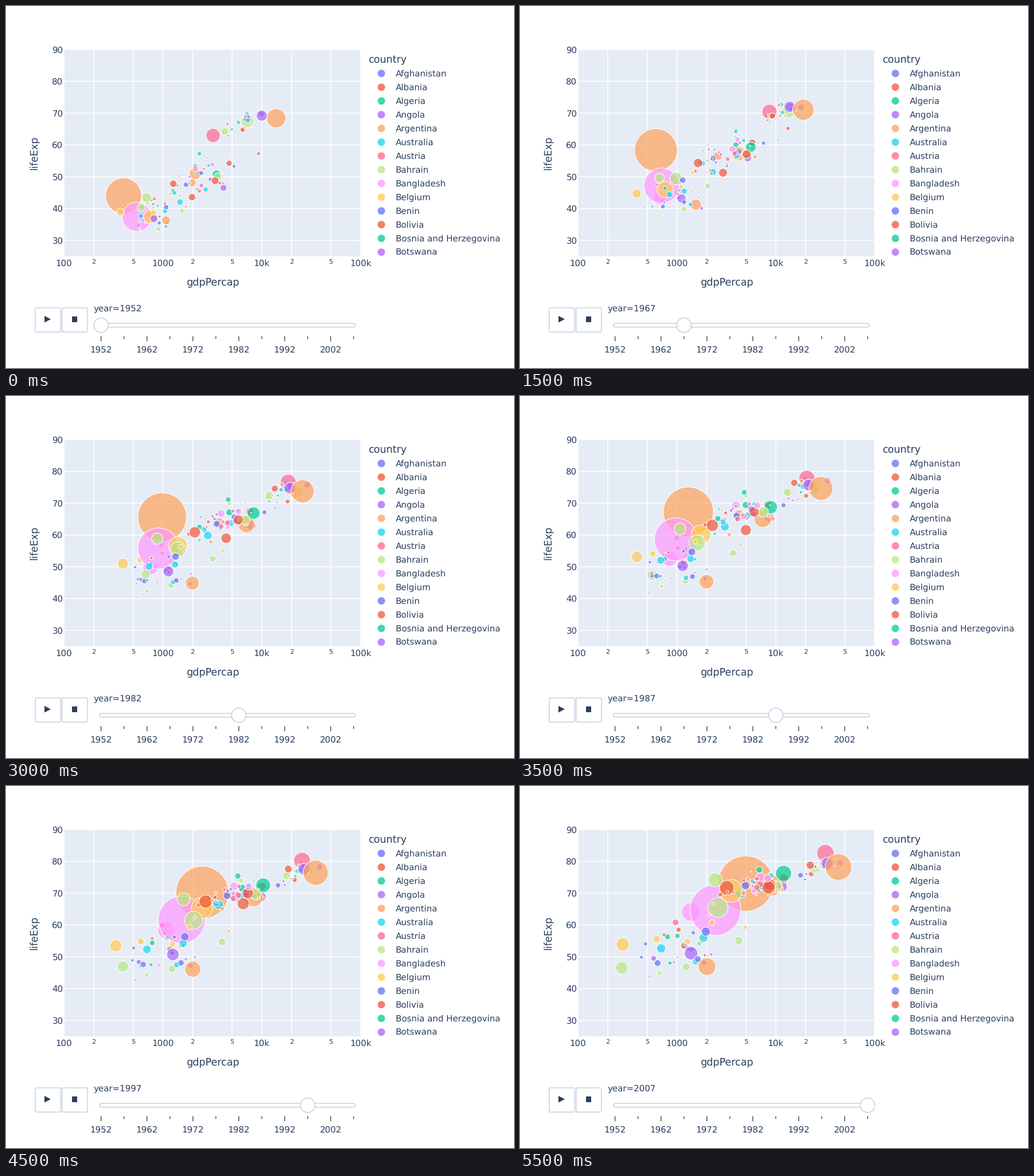
A matplotlib script that plays this animation: 885x632 px, repeating every 6000 ms.

```python
import numpy as np
import matplotlib.pyplot as plt
from matplotlib.animation import FuncAnimation
from matplotlib.colors import to_rgba
from matplotlib.patches import Circle, FancyBboxPatch, Polygon, Rectangle

W, H, DPI = 885, 632, 64
PT = 72 / DPI  # points per pixel
LEFT, RIGHT, TOP, BOTTOM = 101, 618, 76, 437
INK, BORDER = "#2a3f5f", "#bec8d9"
PALETTE = ["#636efa", "#ef553b", "#00cc96", "#ab63fa", "#ffa15a",
           "#19d3f3", "#ff6692", "#b6e880", "#ff97ff", "#fecb52"]
LEGEND = ["Afghanistan", "Albania", "Algeria", "Angola", "Argentina",
          "Australia", "Austria", "Bahrain", "Bangladesh", "Belgium", "Benin",
          "Bolivia", "Bosnia and Herzegovina", "Botswana"]
YEARS = np.arange(1952, 2008, 5)
KNOTS = {2: (1952, 2007), 3: (1952, 1977, 2007), 4: (1952, 1967, 1987, 2007),
         6: (1952, 1962, 1967, 1977, 1990, 2007)}
MAX_RADIUS, MAX_POP = 48.3, 1319
COUNT = 142

tracks = {}


def px(gdp):
    return LEFT + (np.log10(gdp) - 2) * (RIGHT - LEFT) / 3


def py(life):
    return BOTTOM - (life - 25) * (BOTTOM - TOP) / 65


def over_years(values):
    return np.interp(YEARS, KNOTS[len(values)], values)


def country(rank, pops, *points):
    """Follow a few (GDP, life expectancy) points; rank sets colour and depth."""
    gdps, lives = np.transpose(points)
    radius = MAX_RADIUS * over_years(np.sqrt(np.array(pops) / MAX_POP))
    tracks[rank] = np.column_stack(
        [over_years(px(gdps)), over_years(py(lives)), radius])


# The most visible bubbles; populations in millions
country(24, (556, 960, 1319), (400, 44), (488, 44.5), (613, 58.4), (741, 64), (1550, 68.2), (4959, 73))
country(58, (372, 1110), (547, 37.4), (701, 47.2), (977, 58.6), (2452, 64.7))
country(59, (82, 224), (750, 37.5), (762, 46), (1748, 60.1), (3541, 70.7))
country(134, (158, 301), (13990, 68.4), (42952, 78.2))
country(14, (57, 190), (2109, 50.9), (6660, 61.5), (9066, 72.4))
country(66, (86, 127), (3217, 63), (16610, 75.4), (31656, 82.6))
country(97, (41, 169), (685, 43.4), (2606, 65.5))
country(8, (47, 150), (684, 37.5), (660, 46.9), (1391, 64.1))
country(94, (33, 135), (1077, 36.3), (1982, 44.5), (2014, 46.9))
country(47, (69, 82), (7144, 67.5), (20513, 72.5), (32170, 79.4))
country(133, (50, 61), (9980, 69.2), (33203, 79.4))
country(82, (30, 109), (3478, 50.8), (7675, 65), (11978, 76.2))
country(137, (26, 85), (605, 40.4), (714, 55.8), (2442, 74.2))
country(101, (22, 91), (1273, 47.8), (3190, 71.7))
country(131, (22, 71), (1969, 43.6), (8458, 71.8))
country(27, (14, 65), (781, 39.1), (796, 47.8), (278, 46.5))

# All others scatter around the path of their income group:
# share, log GDP, its spread, life expectancy, its spread, growth, median size
GROUPS = [
    (.40, (2.95, 3.06, 3.08, 3.15), (.18, .30), (39, 45, 52, 54), (4, 6), 3.0, 3.5),
    (.36, (3.36, 3.54, 3.69, 3.84), (.22, .22), (50, 58, 67.5, 73), (6, 2.5), 2.4, 3.2),
    (.24, (3.82, 4.08, 4.30, 4.48), (.14, .12), (67, 70.5, 75, 78.8), (2.5, 1.5), 1.25, 4.5),
]
rng = np.random.default_rng(14)
for rank in range(COUNT):
    if rank in tracks:
        continue
    group = rng.choice(3, p=[g[0] for g in GROUPS])
    _, level, spread, lives, life_spread, growth, size = GROUPS[group]
    wealth, health = rng.normal(size=2)
    health = .5 * wealth + .8 * health
    gdp = 10 ** (np.array(level) + wealth * np.linspace(*spread, 4)
                 + rng.normal(0, .04, 4))
    life = np.array(lives) + health * np.linspace(*life_spread, 4) + rng.normal(0, .6, 4)
    pop = np.clip(size * np.exp(1.25 * rng.normal()), .06, 25)
    country(rank, (pop, pop * growth), *zip(gdp, life))

order = sorted(tracks)
frames = np.stack([tracks[rank] for rank in order], axis=1)

plt.rcParams.update({"font.family": "DejaVu Sans", "text.hinting": "none"})
fig = plt.figure(figsize=(W / DPI, H / DPI), dpi=DPI, facecolor="white")
ax = fig.add_axes([0, 0, 1, 1])
ax.set(xlim=(0, W), ylim=(H, 0))
ax.axis("off")


def label(x, baseline, text, size=15.05, ha="center", va="baseline", **kw):
    return ax.text(x, baseline, text, fontsize=size * PT, color=INK,
                   ha=ha, va=va, **kw)


def line(xs, ys, color, width):
    ax.plot(xs, ys, color=color, lw=width * PT, zorder=1,
            solid_capstyle="butt", snap=False)


def rounded(x0, y0, x1, y1, radius):
    ax.add_patch(FancyBboxPatch(
        (x0, y0), x1 - x0, y1 - y0, fc="white", ec=BORDER, lw=1.26 * PT,
        boxstyle=f"round,pad=0,rounding_size={radius}", zorder=2))


# Plot area, grid and axis labels
area = Rectangle((LEFT, TOP), RIGHT - LEFT, BOTTOM - TOP, fc="#e5ecf6", lw=0, zorder=0)
ax.add_patch(area)
for life in range(30, 91, 10):
    line((LEFT, RIGHT), (py(life),) * 2, "white", 1.6)
    label(99.5, py(life) + 5.5, str(life), ha="right")
for power, name in zip(range(2, 6), ("100", "1000", "10k", "100k")):
    label(px(10 ** power), 454, name)
    for digit in (1, 2, 5) if power < 5 else (1,):
        x = px(digit * 10 ** power)
        line((x, x), (TOP, BOTTOM), "white", 1.6)
        if digit > 1:
            label(x, 450.3, str(digit), 11.3)
label(359.7, 488, "gdpPercap", 17.5)
label(50, 256.5, "lifeExp", 17.5, va="center", rotation=90)

# Legend
label(631, 99, "country", 17.5, ha="left")
for i, name in enumerate(LEGEND):
    y = 117.7 + 24 * i
    ax.add_patch(Circle((653.9, y), 6.5, fc=PALETTE[i % 10], alpha=.75, lw=0))
    label(679, y + 5.4, name, ha="left")

# Buttons and slider
rounded(50.8, 527, 95.2, 569.3, 2.5)
rounded(97.6, 527, 142, 569.3, 2.5)
ax.add_patch(Polygon([(67, 541), (67, 552.6), (78, 546.8)], fc=INK, lw=0, zorder=3))
ax.add_patch(Rectangle((114.5, 542.3), 9.2, 9.2, fc=INK, lw=0, zorder=3))
rounded(163, 554.2, 608.3, 560.6, 3)
for i, year in enumerate(YEARS):
    x = 165.6 + 40 * i
    major = i % 2 == 0
    line((x, x), (576.5, 585.3 if major else 581.3), "#333333", 1.26)
    if major:
        label(x, 605, str(year))
year_label = label(153, 533, "", ha="left")
handle = Circle((165.6, 557.4), 12.6, fc="white", ec=BORDER, lw=1.26 * PT, zorder=4)
ax.add_patch(handle)

bubbles = ax.scatter(frames[0, :, 0], frames[0, :, 1], lw=1.26 * PT, zorder=3)
bubbles.set_facecolor([to_rgba(PALETTE[rank % 10], .7) for rank in order])
bubbles.set_edgecolor((1, 1, 1, .85))
bubbles.set_clip_path(area)


def update(step):
    bubbles.set_offsets(frames[step, :, :2])
    bubbles.set_sizes((2 * frames[step, :, 2] * PT) ** 2)
    year_label.set_text(f"year={YEARS[step]}")
    handle.center = (165.6 + 40 * step, 557.4)
    return bubbles, year_label, handle


anim = FuncAnimation(fig, update, frames=len(YEARS), interval=500,
                     repeat=True, repeat_delay=0, blit=False)
plt.show()
```
